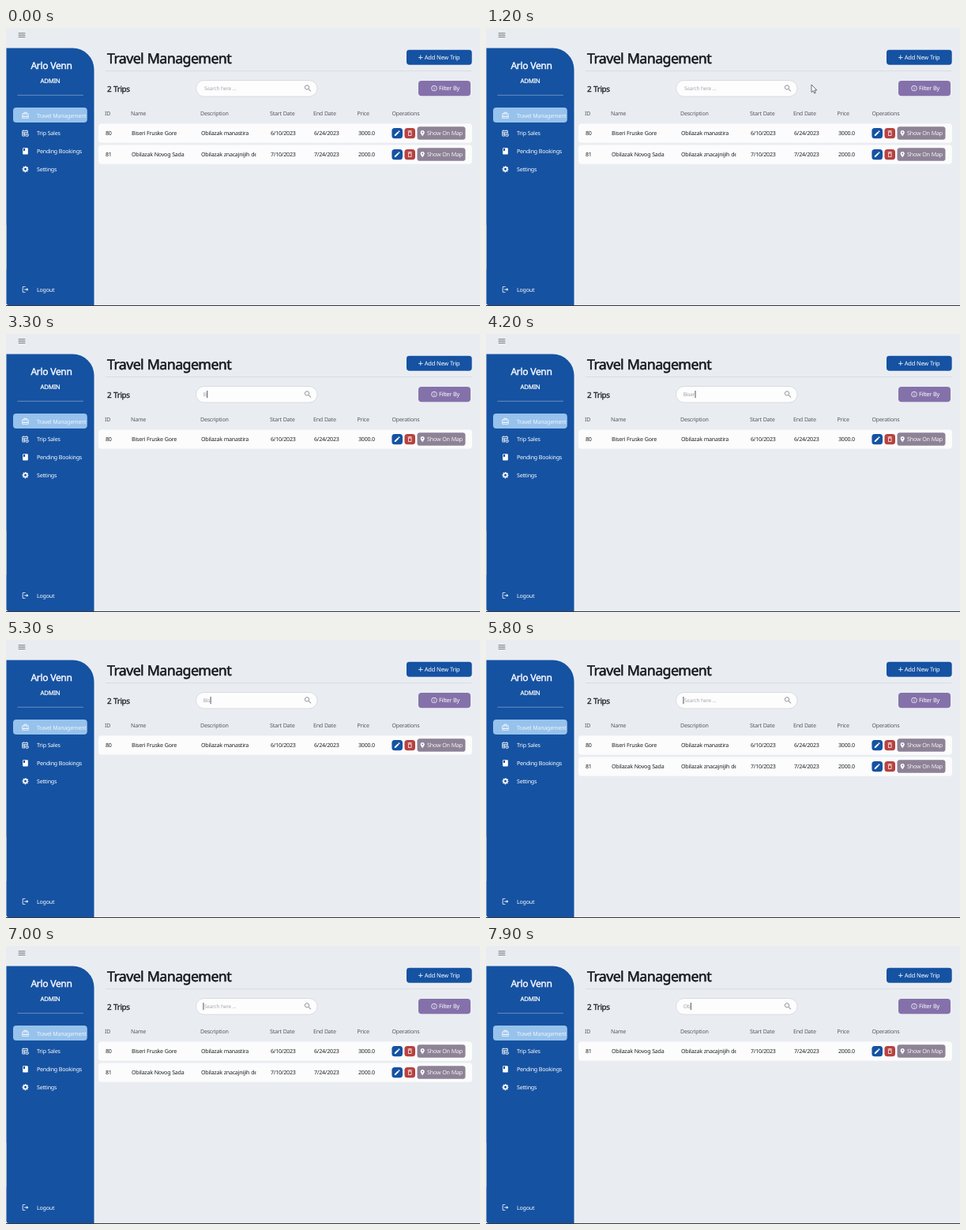
Animation of 600x353 px, one loop 8 s. Source, as an HTML page:

```html
<!DOCTYPE html>
<html lang="en">
<head>
<meta charset="utf-8">
<title>Travel Management</title>
<style>
  html, body { margin: 0; width: 100%; height: 100%; overflow: hidden; background: #e9edf2; }
  svg { display: block; width: 100vw; height: 100vh; }
  text {
    font-family: "Noto Sans", "Open Sans", sans-serif; font-size: 7.1px; white-space: pre;
    letter-spacing: -.033em; word-spacing: .04em; text-rendering: geometricPrecision;
  }
</style>
</head>
<body>
<svg id="stage" viewBox="0 0 600 353">
  <defs>
    <clipPath id="descriptionClip"><rect x="240" y="120" width="76.5" height="30"/></clipPath>
    <clipPath id="menuClip"><rect x="9" y="100" width="93.3" height="22"/></clipPath>
  </defs>
  <g id="page"></g>
  <text id="query" y="79.2" style="font-size:6.5px"></text>
  <rect id="caret" y="72" width="1" height="9.2" fill="#50545a"/>
  <path id="arrow" d="M0 0V9.6L2.2 7.6 3.7 11 5.3 10.3 3.8 7H6.8Z" fill="#fff" stroke="#33363b" stroke-width=".7" stroke-linejoin="round"/>
  <path id="beam" d="M-2-5H-.6L0-4.5.6-5H2M0-4.5V4.5M-2 5H-.6L0 4.5.6 5H2" fill="none" stroke="#44474c" stroke-width=".8"/>
</svg>
<script>
const LOOP = 8000;
const BLUE = '#1552a2', INK = '#1d2024', GREY = '#56595f';
const $ = id => document.getElementById(id);
const page = $('page');

const ICONS = {
  menu: 'M3 17.7h18v-1.6H3zM3 12.8h18v-1.6H3zM3 6.3v1.6h18V6.3z',
  travel: 'M20 6h-3V4c0-1.1-.9-2-2-2H9c-1.1 0-2 .9-2 2v2H4c-1.1 0-2 .9-2 2v11c0 1.1.9 2 2 2h16c1.1 0 2-.9 2-2V8c0-1.1-.9-2-2-2zM9 4h6v2H9zM20 19H4v-2h16zM20 14H4V8h3v2h2V8h6v2h2V8h3z',
  book: 'M18 2H6c-1.1 0-2 .9-2 2v16c0 1.1.9 2 2 2h12c1.1 0 2-.9 2-2V4c0-1.1-.9-2-2-2zM6 4h5v8l-2.5-1.5L6 12z',
  logout: 'M17 8l-1.4 1.4L17.2 11H9v2h8.2l-1.6 1.6L17 16l4-4zM5 5h7V3H5c-1.1 0-2 .9-2 2v14c0 1.1.9 2 2 2h7v-2H5z',
  edit: 'M3 17.2V21h3.8L17.8 9.9l-3.7-3.7zM20.7 7a1 1 0 0 0 0-1.4l-2.3-2.3a1 1 0 0 0-1.4 0l-1.9 1.8 3.8 3.8z',
  bin: 'M6 19c0 1.1.9 2 2 2h8c1.1 0 2-.9 2-2V7H6zM8 9h8v10H8zM15.5 4l-1-1h-5l-1 1H5v2h14V4z',
  pin: 'M12 2C8.1 2 5 5.1 5 9c0 5.2 7 13 7 13s7-7.8 7-13c0-3.9-3.1-7-7-7zM12 11.5a2.5 2.5 0 0 1 0-5 2.5 2.5 0 0 1 0 5z',
  search: 'M15.5 14h-.8l-.3-.3A6.5 6.5 0 1 0 13.7 14.4l.3.3v.8l5 5 1.5-1.5zM9.5 14a4.5 4.5 0 1 1 0-9 4.5 4.5 0 0 1 0 9z',
  info: 'M11 7h2v2h-2zM11 11h2v6h-2zM12 2a10 10 0 1 0 0 20 10 10 0 0 0 0-20zM12 20a8 8 0 1 1 0-16 8 8 0 0 1 0 16z',
  add: 'M19 13h-6v6h-2v-6H5v-2h6V5h2v6h6z'
};

function add(tag, attrs, parent = page, content) {
  const node = document.createElementNS('http://www.w3.org/2000/svg', tag);
  for (const key in attrs) node.setAttribute(key, attrs[key]);
  if (content) node.textContent = content;
  return parent.appendChild(node);
}
const box = (x, y, width, height, rx, fill, parent, extra) =>
  add('rect', { x, y, width, height, rx, fill, ...extra }, parent);
const line = (x1, x2, y, stroke) => add('path', { d: `M${x1} ${y}H${x2}`, stroke, 'stroke-width': .8 });
const label = (content, x, y, fill, size = 7.1, parent = page, extra = {}) =>
  add('text', { x, y, fill, style: `font-size:${size}px`, ...extra }, parent, content);
// A thin outline gives a weight between regular and bold.
const heading = (content, x, y, fill, size, extra) =>
  label(content, x, y, fill, size, page, { stroke: fill, 'stroke-width': size * .03, ...extra });
const at = (cx, cy, size) => `translate(${cx - size / 2} ${cy - size / 2}) scale(${size / 24})`;
const icon = (name, cx, cy, size, fill, parent) =>
  add('path', { d: ICONS[name], fill, 'fill-rule': 'evenodd', transform: at(cx, cy, size) }, parent);

function drawSidebar() {
  icon('menu', 20, 9, 11.5, '#5d6065');
  add('path', { d: 'M.5 25.5H84.5A27 27 0 0 1 111.5 52.5V352H3.5Q.5 352 .5 349Z', fill: BLUE });
  box(0, 352, 600, 1, 0, '#34383f');
  box(0, 250, .8, 56, 0, '#b4b9c0');
  const middle = { 'text-anchor': 'middle' };
  heading('Arlo Venn', 57.5, 52.1, '#fff', 12.1, middle);
  heading('ADMIN', 56, 69.5, '#fff', 7.8, middle);
  line(14.5, 98, 85.3, '#7f9cc4');

  box(9, 101, 93.8, 19, 4, '#97c2ec');
  icon('travel', 24.5, 111, 10, '#f4f8fd');
  label('Travel Management', 39, 113.6, '#f1f6fc', 7.1, page, { 'clip-path': 'url(#menuClip)' });

  const sales = add('g', { transform: at(24.5, 133.7, 10), fill: 'none', stroke: '#fff', 'stroke-width': 2 });
  add('path', { d: 'M19 11V4H3V20H11M3 9H19M9 9V20M3 14H12M7 2V5M15 2V5' }, sales);
  add('circle', { cx: 17, cy: 17, r: 4.5 }, sales);
  add('path', { d: 'M17 14.5V17.5H19' }, sales);
  label('Trip Sales', 39, 136.4, '#fff');

  icon('book', 24.5, 156.3, 10, '#fff');
  label('Pending Bookings', 39, 158.8, '#fff');

  const gear = add('g', { transform: at(24.5, 179.3, 10), fill: 'none', stroke: '#fff' });
  add('circle', { cx: 12, cy: 12, r: 5.6, 'stroke-width': 4.2 }, gear);
  add('circle', { cx: 12, cy: 12, r: 8.3, 'stroke-width': 3, pathLength: 16, 'stroke-dasharray': '1 1', 'stroke-dashoffset': .5 }, gear);
  label('Settings', 39, 181.6, '#fff');

  icon('logout', 24.5, 332, 10, '#fff');
  label('Logout', 39, 334.6, '#fff');
}

function drawHeader() {
  heading('Travel Management', 128, 44.8, '#17191c', 17.8);
  line(126, 589, 54.5, '#d6dadf');
  box(507, 27.8, 82.7, 18.9, 3.6, BLUE);
  icon('add', 524.8, 37.3, 9.6, '#fff');
  label('Add New Trip', 529.8, 40, '#fff', 7.5);

  heading('2 Trips', 128, 80.6, INK, 9.9);
  box(240.5, 66.5, 153.5, 20.5, 10.2, '#fdfdfe', page, { stroke: '#d2d5da', 'stroke-width': .8 });
  icon('search', 382.2, 76.6, 11.5, '#95989d');
  box(522, 67, 66, 19.3, 4, '#8571aa');
  icon('info', 542, 76.6, 8.6, '#fff');
  label('Filter By', 548, 79.2, '#fff', 7.4);

  const columns = [['ID', 125], ['Name', 158], ['Description', 246], ['Start Date', 334],
    ['End Date', 389], ['Price', 444.5], ['Operations', 488.5]];
  columns.forEach(([name, x]) => label(name, x, 111.3, GREY));
}

function drawRow([id, name, description, start, end, price]) {
  const row = add('g', {});
  box(117, 121.5, 473, 24.3, 4, '#fcfcfd', row);
  const cell = (content, x) => label(content, x, 136.4, INK, 7.1, row);
  cell(id, 126);
  cell(name, 159);
  cell(description, 247).setAttribute('clip-path', 'url(#descriptionClip)');
  cell(start, 335);
  cell(end, 390);
  cell(price, 446);
  box(488.4, 127, 13.6, 13.3, 3.6, BLUE, row);
  icon('edit', 495.2, 133.6, 9, '#fff', row);
  box(504.5, 127, 13.5, 13.3, 3.6, '#b7423f', row);
  icon('bin', 511.2, 133.6, 9, '#fff', row);
  box(520.5, 125.2, 61, 16.6, 3.4, '#8d8296', row);
  icon('pin', 527.2, 133.6, 8.8, '#fff', row);
  label('Show On Map', 533, 136.3, '#f5f3f7', 7.2, row);
  return row;
}

drawSidebar();
drawHeader();
const trips = [
  ['80', 'Biseri Fruske Gore', 'Obilazak manastira', '6/10/2023', '6/24/2023', '3000.0'],
  ['81', 'Obilazak Novog Sada', 'Obilazak znacajnijih delova', '7/10/2023', '7/24/2023', '2000.0']
];
const rows = trips.map(drawRow);

// [time, search text]
const typing = [[0, ''], [3000, 'B'], [3400, 'Bi'], [3700, 'Bis'], [4000, 'Bise'], [4200, 'Biser'], [4500, 'Biseri'],
  [5100, 'Biser'], [5200, 'Bise'], [5300, 'Bis'], [5450, 'Bi'], [5600, 'B'], [5700, ''], [7300, 'O'], [7600, 'Ob']];
// [time, x, y]
const pointer = [[700, 592, 8], [1200, 412, 72], [1900, 296, 77]];
const FOCUS = 2100, POINTER_HIDES = 3000;
const caretGaps = [[2600, 3000], [6200, 6600]];

function pointerAt(t) {
  let i = 1;
  while (i < pointer.length - 1 && t > pointer[i][0]) i++;
  const [t0, x0, y0] = pointer[i - 1], [t1, x1, y1] = pointer[i];
  const p = Math.min(1, Math.max(0, (t - t0) / (t1 - t0)));
  const k = p * p * (3 - 2 * p);
  return [x0 + (x1 - x0) * k, y0 + (y1 - y0) * k];
}

const show = (node, visible) => node.setAttribute('visibility', visible ? 'visible' : 'hidden');

function render(t) {
  const text = typing.filter(([time]) => time <= t).pop()[1];
  const query = $('query');
  query.textContent = text || 'Search here ...';
  query.setAttribute('fill', text ? '#9b9ea3' : '#a6a9ae');
  query.setAttribute('x', text ? 249.8 : 251);

  const caret = $('caret');
  caret.setAttribute('x', text ? 250.2 + query.getComputedTextLength() : 249.4);
  show(caret, t >= FOCUS && !caretGaps.some(([from, to]) => t >= from && t < to));

  let slot = 0;
  rows.forEach((row, i) => {
    const matches = trips[i][1].startsWith(text);
    show(row, matches);
    row.setAttribute('transform', `translate(0 ${matches ? 27 * slot++ : 0})`);
  });

  const [x, y] = pointerAt(t);
  const active = t >= pointer[0][0] && t < POINTER_HIDES;
  const overInput = x < 394;
  for (const id of ['arrow', 'beam']) {
    $(id).setAttribute('transform', `translate(${x} ${y})`);
    show($(id), active && overInput === (id === 'beam'));
  }
}

const begin = performance.now();
function tick() {
  render((performance.now() - begin) % LOOP);
  requestAnimationFrame(tick);
}
tick();
</script>
</body>
</html>
```
